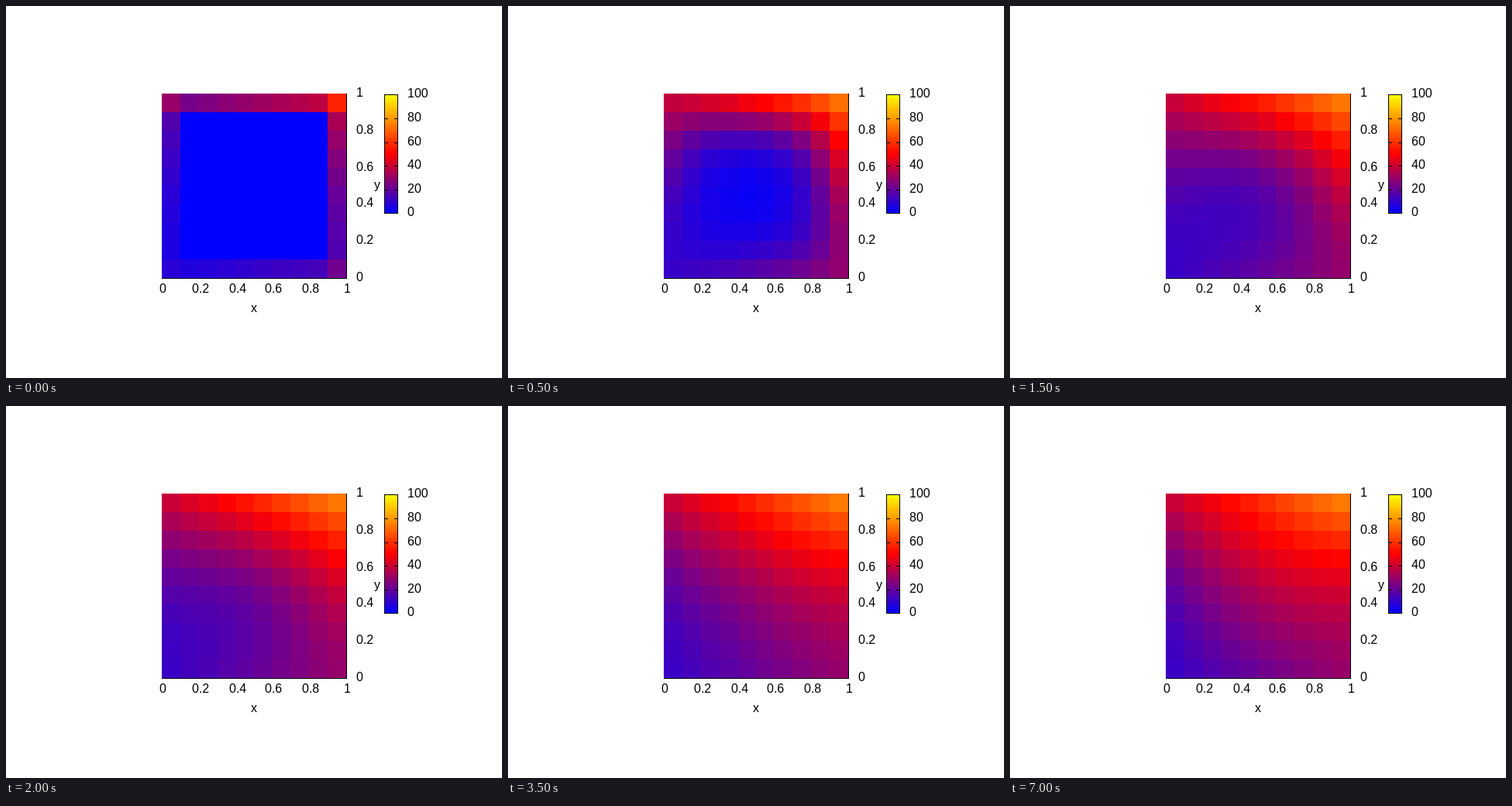
Animation, 640 px wide and 480 px high, one loop 8 s. Source, as an HTML page with a canvas:

```html
<!DOCTYPE html>
<html lang="en">
<head>
<meta charset="utf-8">
<title>Heat map</title>
<style>
  html, body { margin: 0; width: 100%; height: 100%; overflow: hidden; background: #fff; }
  canvas { display: block; }
</style>
</head>
<body>
<canvas id="stage" width="640" height="480"></canvas>
<script>
const ctx = document.getElementById('stage').getContext('2d');
const N = 10, CENTER_X = 320, CENTER_Y = 232, CELL = 23.8;
const LOOP = 8000, STEP = 500, ALPHA = 0.1, SUBSTEPS = 19;
const SHOWN = [0, 1, 2, 3, 4, 5, 7, 14]; // steps at which the picture is refreshed

// Fixed edge temperatures, cold interior
function initialField() {
  return Array.from({ length: N + 1 }, (_, j) => Array.from({ length: N + 1 }, (_, i) => {
    const x = i / N, y = j / N;
    if (j === 0) return 10 + 20 * x;
    if (j === N) return 40 + 40 * x;
    if (i === 0) return 10 + 30 * y * y;
    if (i === N) return 30 + 50 * y * y;
    return 0;
  }));
}

function diffuse(u) {
  return u.map((row, j) => row.map((v, i) =>
    i % N === 0 || j % N === 0 ? v :
    v + ALPHA * (u[j - 1][i] + u[j + 1][i] + row[i - 1] + row[i + 1] - 4 * v)));
}

const fields = [initialField()];
for (let s = 1; s < LOOP / STEP; s++) {
  let u = fields[s - 1];
  for (let k = 0; k < SUBSTEPS; k++) u = diffuse(u);
  fields.push(u);
}

// Blue at 0, red at 50, yellow at 100
function heatColor(v) {
  const t = v / 50;
  const level = c => Math.round(255 * Math.max(0, Math.min(1, c)));
  return `rgb(${level(t)},${level(t - 1)},${level(1 - t)})`;
}

// Pixel position of grid line k
const offset = k => Math.trunc((k - N / 2) * CELL);
const gridX = k => CENTER_X + offset(k);
const gridY = k => CENTER_Y - offset(k);

function drawCells(u) {
  for (let j = 0; j < N; j++) {
    for (let i = 0; i < N; i++) {
      const mean = (u[j][i] + u[j][i + 1] + u[j + 1][i] + u[j + 1][i + 1]) / 4;
      ctx.fillStyle = heatColor(mean);
      ctx.fillRect(gridX(i), gridY(j + 1), gridX(i + 1) - gridX(i), gridY(j) - gridY(j + 1));
    }
  }
}

function drawAxes() {
  ctx.fillStyle = '#000';
  ctx.fillRect(gridX(N), gridY(N), 1, 239);
  ctx.fillRect(gridX(0), gridY(0), 239, 1);
  ['0', '0.2', '0.4', '0.6', '0.8', '1'].forEach((text, k) => {
    ctx.fillText(text, gridX(2 * k) - 3 * text.length, 370);
    ctx.fillText(text, 452, gridY(2 * k) + 4);
  });
  ctx.fillText('x', 316, 395);
  ctx.fillText('y', 475, 236);
}

function drawColorBar() {
  const gradient = ctx.createLinearGradient(0, 267, 0, 114);
  [0, 50, 100].forEach(v => gradient.addColorStop(v / 100, heatColor(v)));
  ctx.fillStyle = gradient;
  ctx.fillRect(488, 114, 18, 154);
  ctx.strokeStyle = ctx.fillStyle = '#000';
  ctx.strokeRect(488.5, 114.5, 17, 153);
  for (let k = 0; k <= 5; k++) {
    const y = Math.ceil(267 - 30.6 * k);
    ctx.fillRect(488, y, 5, 1);
    ctx.fillRect(501, y, 5, 1);
    ctx.fillText(20 * k, 518, y + 4);
  }
}

ctx.fillStyle = '#fff';
ctx.fillRect(0, 0, 640, 480);
ctx.font = '16px "Liberation Sans", Arial, sans-serif';
drawAxes();
drawColorBar();

function frame() {
  const step = Math.floor(performance.now() % LOOP / STEP);
  drawCells(fields[SHOWN.filter(s => s <= step).pop()]);
  requestAnimationFrame(frame);
}
frame();
</script>
</body>
</html>
```
